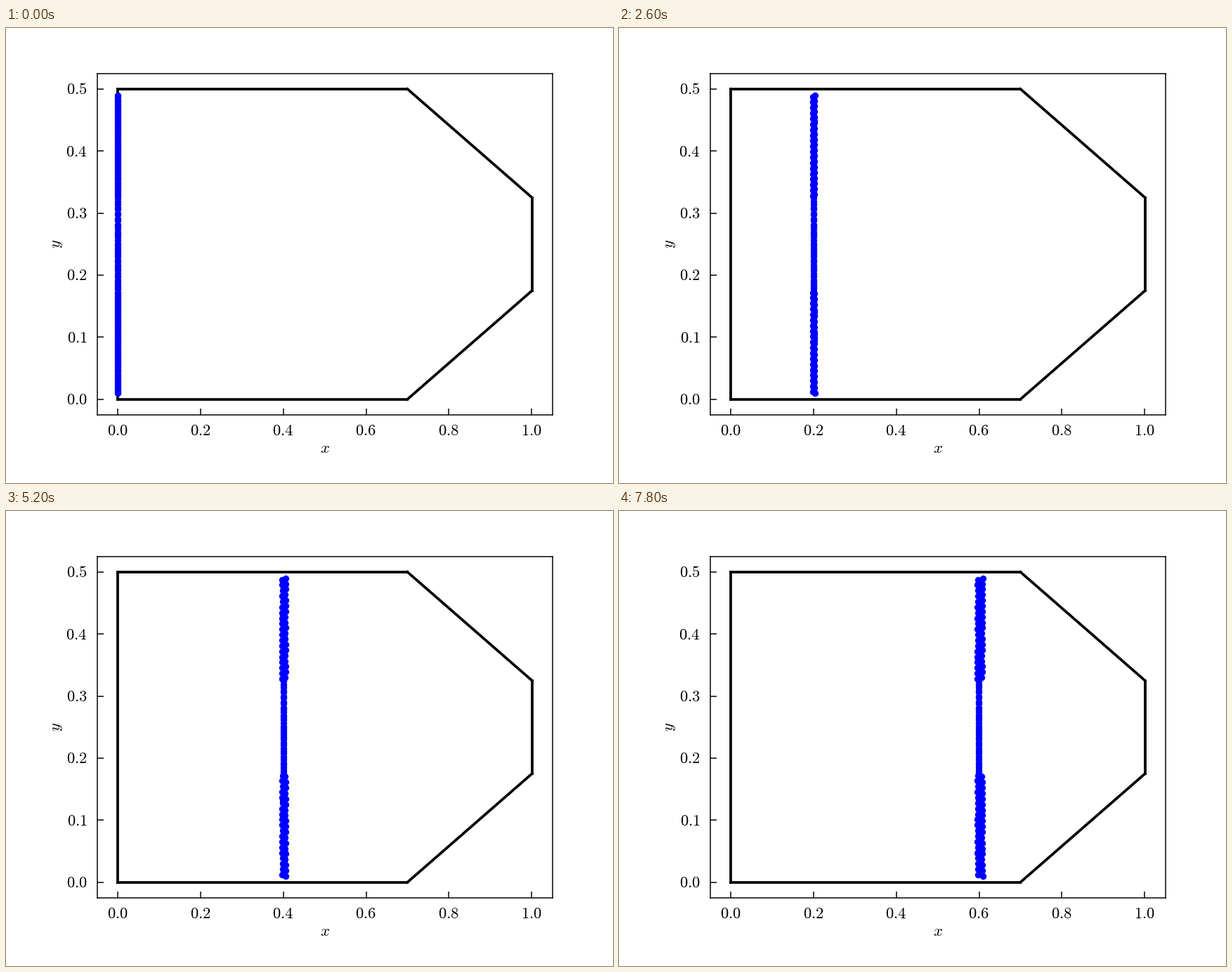
Animation, 864 px wide and 648 px high, one loop 8 s. Source, as a matplotlib script:

```python
import numpy as np
import matplotlib.pyplot as plt
from matplotlib.animation import FuncAnimation

W, H, DPI = 864, 648, 135
FRAMES, INTERVAL = 40, 200
SPEED = 0.01538      # x units per frame
PITCH = 0.48 / 54    # spacing of neighbouring dots in one column
ROWS = 19            # rows between a side wall and the exit's edge
PX = 1 / 589.1       # one pixel in x units

plt.rcParams["mathtext.fontset"] = "cm"
fig = plt.figure(figsize=(W / DPI, H / DPI), dpi=DPI, facecolor="white")
ax = fig.add_axes([0.15, 0.15, 0.75, 0.75])
ax.set(xlim=(-0.05, 1.05), ylim=(-0.025, 0.525))
ax.set_xticks(np.arange(6) * 0.2)
ax.set_yticks(np.arange(6) * 0.1)
ax.tick_params(direction="in", length=5, width=0.8,
               labelbottom=False, labelleft=False)


def label(x, y, s, ha="center", rotation=0):
    fig.text(x / W, 1 - y / H, f"${s}$", fontsize=12, ha=ha, va="baseline",
             rotation=rotation, rotation_mode="anchor")


for i in range(6):
    label(158.6 + 117.8 * i, 579.8, f"{0.2 * i:.1f}")
    label(115.6, 536.2 - 88.36 * i, f"{0.1 * i:.1f}", ha="right")
label(453.6, 605.3, "x")
label(77, 307.8, "y", rotation=90)

# room outline, one segment per wall
corners = [(0, 0), (0.7, 0), (1.001, 0.175), (1.001, 0.325),
           (0.7, 0.5), (0, 0.5), (0, 0)]
for (x0, y0), (x1, y1) in zip(corners, corners[1:]):
    ax.plot([x0, x1], [y0, y1], color="black", lw=2,
            solid_capstyle="projecting", zorder=2)

rng = np.random.default_rng(4)


def side():
    """Heights above a side wall, and pixels gained on the middle by the end."""
    k = np.arange(ROWS)
    fast = 4.3 + 1.1 * np.exp(-k) + rng.uniform(-0.4, 0.4, ROWS)
    slow = rng.uniform(-2.6, -1.2, ROWS)
    between = rng.uniform(-0.5, 2.5, ROWS - 1)
    y = np.concatenate([0.01 + k * PITCH, 0.0121 + k * PITCH,
                        0.0121 + (k[:-1] + 0.4) * PITCH])
    return y, np.concatenate([fast, slow, between])


low_y, low_gain = side()
top_y, top_gain = side()
mid_y = np.arange(0.176, 0.325, PITCH / 2)
mid_y += rng.uniform(-0.15, 0.15, mid_y.size) * PITCH

ys = np.concatenate([low_y, mid_y, 0.5 - top_y])
gain = np.concatenate([low_gain, 0 * mid_y, top_gain])
rates = SPEED + gain * PX / (FRAMES - 1)
dots, = ax.plot(0 * ys, ys, "o", color="blue", ms=4, mew=1, zorder=3)


def update(i):
    dots.set_xdata(rates * i)
    return dots,


anim = FuncAnimation(fig, update, frames=FRAMES, interval=INTERVAL,
                     repeat=True, repeat_delay=0)
plt.show()
```
